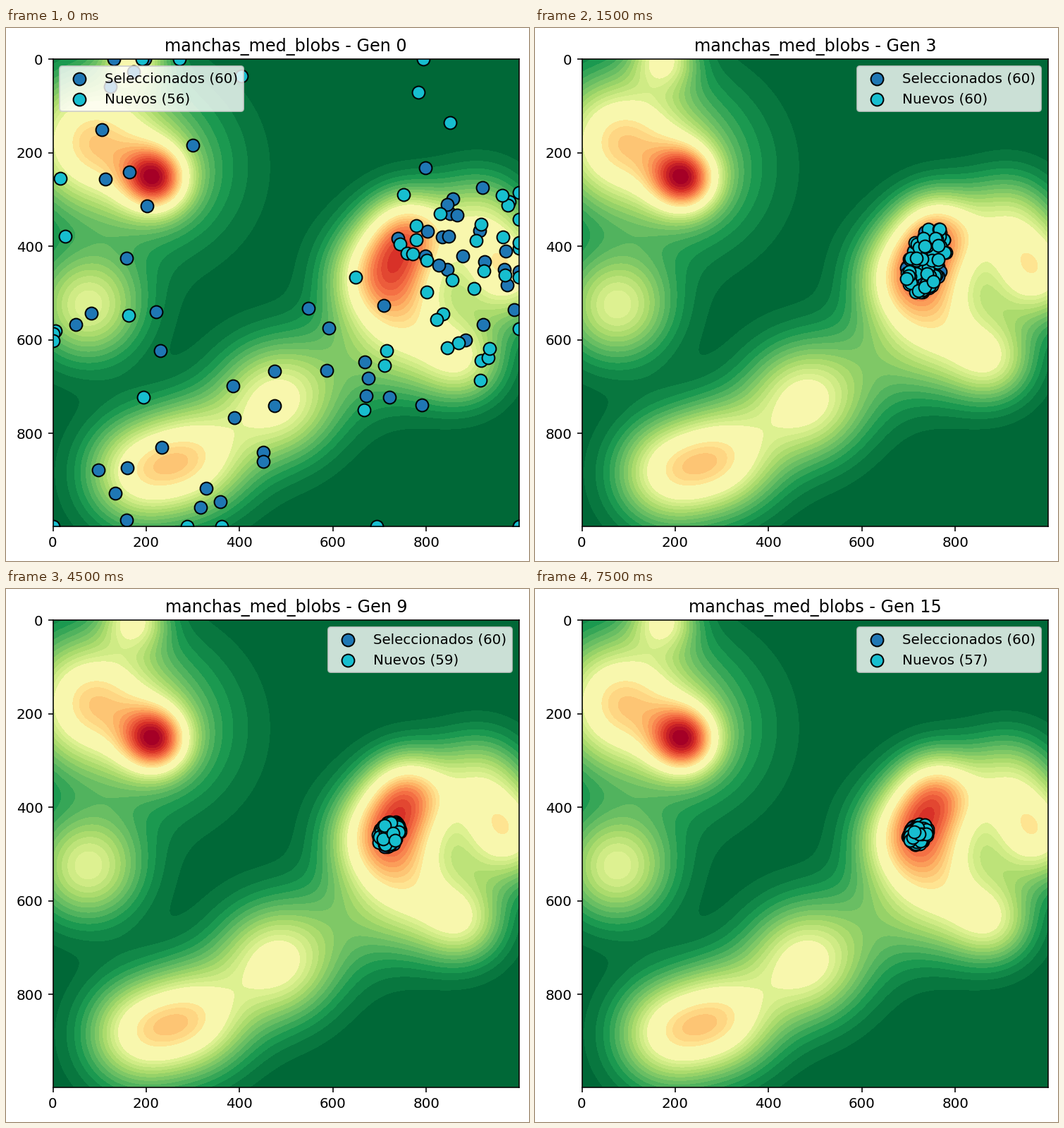
A matplotlib script for the animation above (8000 ms loop, 742 by 755 pixels).

```python
import numpy as np
import matplotlib.pyplot as plt
from matplotlib.animation import FuncAnimation

W, H, DPI = 742, 755, 143.5
LEFT, TOP, SIDE = 66.5, 44.5, 661.5
SIZE = 999
LAYERS = 30
NEW_COUNTS = [56, 60, 59, 60, 59, 58, 60, 59, 59, 59, 60, 58, 60, 59, 59, 57]

# Terrain hills: x, y, height, spread
HILLS = np.array([
    (219, 256, .63, 49), (215, 230, .24, 125), (75, 172, .50, 95),
    (175, -5, .38, 47), (75, 527, .41, 80), (476, 733, .46, 86),
    (180, 885, .43, 77), (305, 852, .47, 79), (620, 650, .11, 85),
    (708, 463, .62, 75), (762, 368, .50, 62), (772, 588, .35, 85),
    (880, 645, .33, 62), (975, 458, .48, 70), (912, 345, .33, 70),
])
EAST = HILLS[9:]


def height(x, y):
    return sum(a * np.exp(-((x - cx) ** 2 + (y - cy) ** 2) / (2 * s * s))
               for cx, cy, a, s in HILLS)


def around(rng, hills, n, stretch):
    """Dots scattered over the hills; strays stop at the border."""
    picks = hills[rng.integers(len(hills), size=n)]
    dots = picks[:, :2] + rng.normal(0, stretch, (n, 2)) * picks[:, 3:]
    return dots.clip(0, SIZE)


def best(dots, n=60):
    return dots[np.argsort(height(*dots.T))[-n:]]


def children(rng, parents, n, sigma):
    picks = parents[rng.integers(len(parents), size=n)]
    return (picks + rng.normal(0, sigma, (n, 2))).clip(0, SIZE)


def cloud(rng, gen, n):
    """Slanted disc of dots that tightens around the eastern summit."""
    fade = np.exp((3 - gen) / 1.2)
    left = 15 - gen
    angle = rng.uniform(0, 2 * np.pi, n)
    radius = np.sqrt(rng.random(n))
    dx = radius * np.cos(angle) * (20.5 + .38 * left + 15 * fade)
    dy = radius * np.sin(angle) * (23.5 + .75 * left + 38 * fade)
    return np.column_stack([720 + 18 * fade + dx - .25 * dy,
                            457 - 27 * fade + dy])


def evolve():
    """Old and new dots of every generation."""
    rng = np.random.default_rng(4)
    steps = []
    for gen, count in enumerate(NEW_COUNTS):
        if gen == 0:
            old = around(rng, HILLS, 60, 1.1)
            new = np.vstack([around(rng, HILLS, 26, 5),
                             around(rng, EAST, count - 26, .7)])
        elif gen < 3:
            old = best(np.vstack(steps[-1]))
            strays = 8 if gen == 1 else 0
            new = np.vstack([around(rng, HILLS, strays, 4),
                             children(rng, best(old, 40), count - strays, 20)])
        else:
            old, new = cloud(rng, gen, 60), cloud(rng, gen, count)
        steps.append((old, new))
    return steps


fig = plt.figure(figsize=((W + .01) / DPI, (H + .01) / DPI), dpi=DPI,
                 facecolor="white")
ax = fig.add_axes([LEFT / W, 1 - (TOP + SIDE) / H, SIDE / W, SIDE / H])

axis = np.linspace(0, SIZE, 400)
terrain = height(*np.meshgrid(axis, axis))
terrain /= terrain.max()
colors = plt.get_cmap("RdYlGn_r")(np.linspace(0, 1, LAYERS))
pale = slice(LAYERS // 2 - 2, LAYERS // 2 + 2)
colors[pale] = colors[pale].mean(axis=0)
levels = np.linspace(0, 1.001, LAYERS + 1)
ax.contourf(axis, axis, terrain, levels=levels, colors=colors)

style = dict(s=80, edgecolors="black", linewidths=1)
old_dots = ax.scatter([], [], facecolors="tab:blue", zorder=2, **style)
new_dots = ax.scatter([], [], facecolors="tab:cyan", zorder=2.1, **style)
ax.set(xlim=(0, SIZE), ylim=(SIZE, 0),
       xticks=range(0, 801, 200), yticks=range(0, 801, 200))

generations = evolve()


def update(gen):
    old, new = generations[gen]
    old_dots.set_offsets(old)
    new_dots.set_offsets(new)
    ax.set_title(f"manchas_med_blobs - Gen {gen}")
    ax.legend([old_dots, new_dots],
              [f"Seleccionados ({len(old)})", f"Nuevos ({len(new)})"],
              loc="upper right" if gen else "upper left")
    return old_dots, new_dots


anim = FuncAnimation(fig, update, frames=len(generations), interval=500,
                     repeat=True, repeat_delay=0, blit=False)
plt.show()
```
